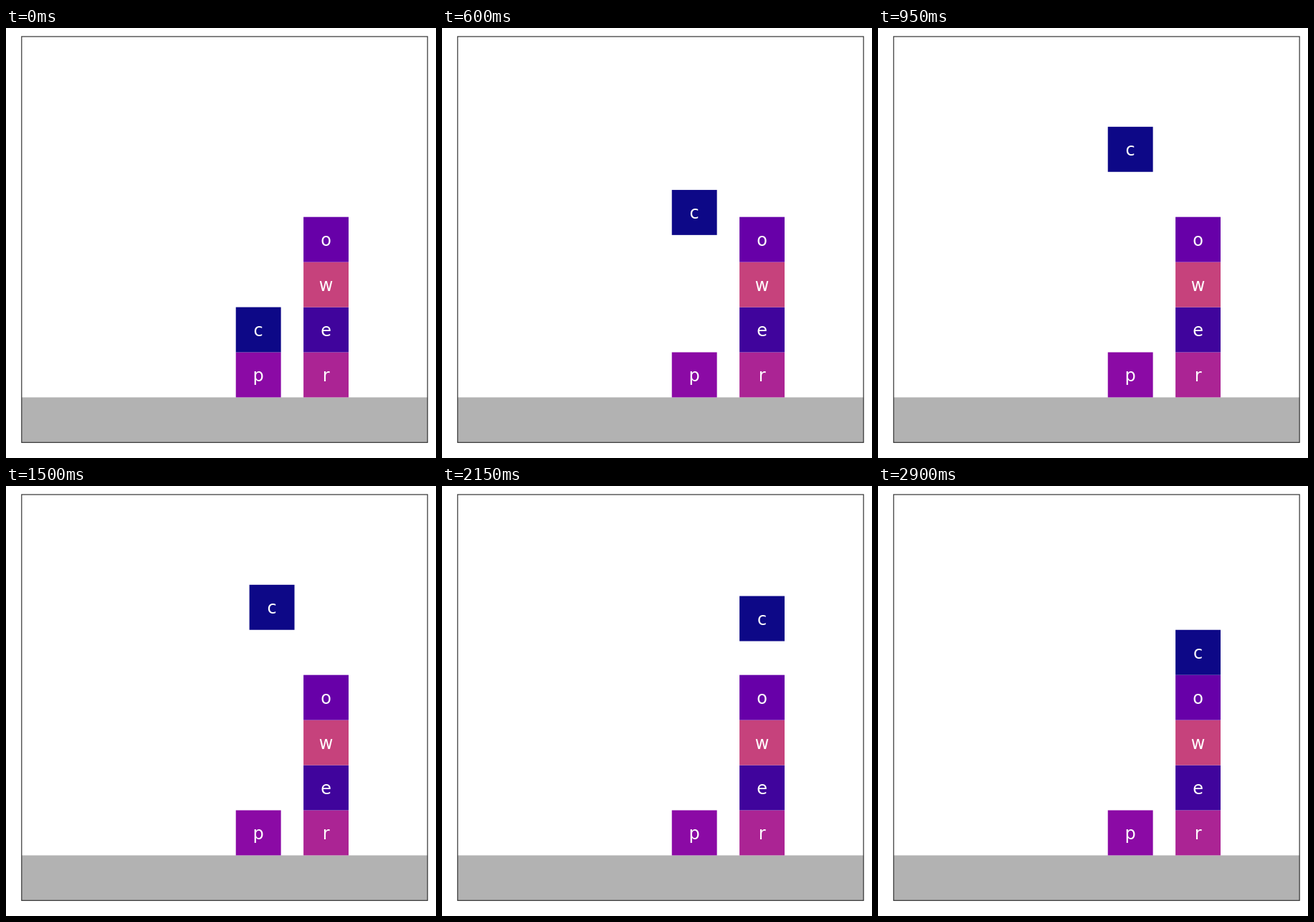
Animation of 600 by 600 pixels, one loop 2950 ms. Source, as an HTML page:

```html
<!DOCTYPE html>
<html lang="en">
<head>
<meta charset="utf-8">
<title>Stacking blocks</title>
<style>
  html, body { margin: 0; width: 100%; height: 100%; overflow: hidden; background: #fff; }
  svg { display: block; width: 100%; height: 100%; }
  text { font: 24px "DejaVu Sans", sans-serif; fill: #fff; text-anchor: middle; }
</style>
</head>
<body>
<svg id="stage" viewBox="0 0 600 600"></svg>
<script>
const NS = "http://www.w3.org/2000/svg";
const UNIT = 62.93, LEFT = 21.8, FLOOR = 515.4;
const TICK = 50, TICKS = 59;
const stage = document.getElementById("stage");

function add(parent, name, attrs, text) {
  const el = document.createElementNS(NS, name);
  for (const key in attrs) el.setAttribute(key, attrs[key]);
  if (text) el.textContent = text;
  return parent.appendChild(el);
}

// Grid position: columns from the left wall, levels above the floor.
function place(block, col, level) {
  const x = LEFT + col * UNIT, y = FLOOR - (level + 1) * UNIT;
  block.setAttribute("transform", `translate(${x.toFixed(2)} ${y.toFixed(2)})`);
}

function addBlock(letter, fill, col, level) {
  const block = add(stage, "g", {});
  add(block, "rect", { width: UNIT, height: UNIT, fill });
  add(block, "text", { x: UNIT / 2, y: 40.2 }, letter);
  place(block, col, level);
  return block;
}

add(stage, "rect", { x: LEFT, y: FLOOR, width: 9 * UNIT, height: UNIT, fill: "#b2b2b2" });
add(stage, "rect", { x: LEFT, y: FLOOR - 8 * UNIT, width: 9 * UNIT, height: 9 * UNIT,
  fill: "none", stroke: "#333", "stroke-width": 1.2 });

addBlock("p", "#8b0aa5", 4.75, 0);
addBlock("r", "#ab2494", 6.25, 0);
addBlock("e", "#40049c", 6.25, 1);
addBlock("w", "#c6427c", 6.25, 2);
addBlock("o", "#6700a8", 6.25, 3);
const mover = addBlock("c", "#0d0887", 4.75, 1);

const progress = (tick, start, length) => Math.min(1, Math.max(0, (tick - start) / length));
// Lift and slide stay at rest for their first tick, then catch up.
const lateStart = (tick, start, length) =>
  tick < start + 2 ? 0 : progress(tick, start, length);

function draw(ms) {
  const tick = Math.floor(ms / TICK) % TICKS;
  const lift = lateStart(tick, -1, 20);
  const slide = lateStart(tick, 28, 10);
  const lower = progress(tick, 38, 20);
  place(mover, 4.75 + 1.5 * slide, 1 + 4 * lift - lower);
}

const begin = performance.now();
function loop() {
  draw(performance.now() - begin);
  requestAnimationFrame(loop);
}
draw(0);
requestAnimationFrame(loop);
</script>
</body>
</html>
```
